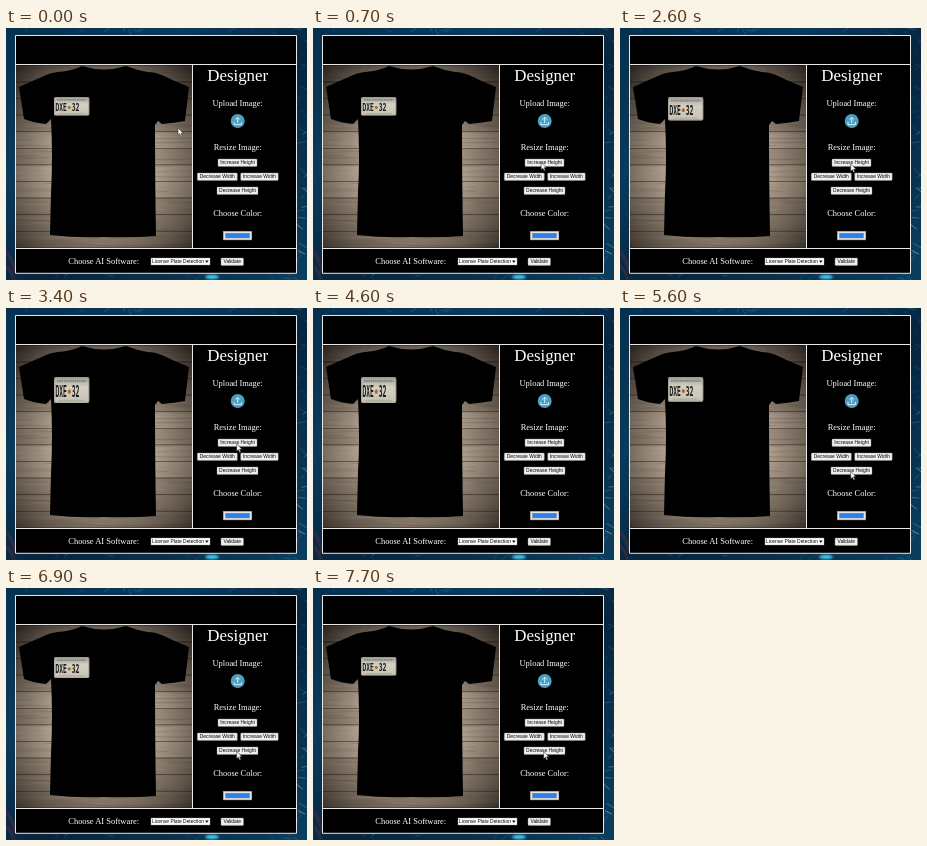
These frames come from a looping animation (301 px wide and 252 px high, 8000 ms). An HTML page:

```html
<!DOCTYPE html>
<html lang="en">
<head>
<meta charset="utf-8">
<title>Designer</title>
<style>
html, body { margin: 0; width: 100%; height: 100%; overflow: hidden; background: #06131f; }
svg { display: block; width: 301px; height: 252px; }
.serif { font: 8.45px "Liberation Serif", serif; fill: #fff; text-anchor: middle; }
.serif .title { font-size: 16.9px; }
.ui { font: 4.95px "Liberation Sans", sans-serif; fill: #000; text-anchor: middle; }
.mono { font: bold 6.3px "Noto Sans Mono", monospace; fill: #1d1c1b; }
</style>
</head>
<body>
<svg viewBox="0 0 301 252">
  <defs>
    <linearGradient id="sky" x2="1" y2="1">
      <stop offset="0" stop-color="#06304f"/>
      <stop offset=".3" stop-color="#0a3a5c"/>
      <stop offset=".55" stop-color="#06253f"/>
      <stop offset="1" stop-color="#0b3f5f"/>
    </linearGradient>
    <radialGradient id="shade" cx=".5" cy=".55" r=".72">
      <stop offset=".4" stop-color="#0d0905" stop-opacity="0"/>
      <stop offset=".75" stop-color="#0d0905" stop-opacity=".42"/>
      <stop offset="1" stop-color="#0d0905" stop-opacity=".8"/>
    </radialGradient>
    <linearGradient id="metal" x2="0" y2="1">
      <stop offset="0" stop-color="#a5a39c"/>
      <stop offset=".4" stop-color="#d3d0c4"/>
      <stop offset="1" stop-color="#c6c2b3"/>
    </linearGradient>
    <filter id="soft" x="-1" y="-1" width="3" height="3"><feGaussianBlur stdDeviation="1.3"/></filter>
    <clipPath id="room"><rect x="10" y="37" width="176" height="183"/></clipPath>
  </defs>

  <rect width="301" height="252" fill="url(#sky)"/>
  <g id="glow" fill="none"></g>
  <g filter="url(#soft)">
    <path d="M0 224Q6 230 9 243M0 238Q5 242 8 252" fill="none" stroke="#8a2c30" stroke-width="1.4" opacity=".75"/>
    <ellipse cx="206" cy="249" rx="7" ry="2.2" fill="#3fc4e6"/>
  </g>

  <rect x="9.5" y="7.5" width="281" height="238" fill="#000"/>
  <g clip-path="url(#room)">
    <g id="wood"></g>
    <rect x="10" y="37" width="176" height="183" fill="url(#shade)"/>
    <path d="M76 38Q66 43 52 44Q43 45 38 48Q24 54 13 59L18 91Q28 95 40 96L45 91Q47 130 45 165L44 207Q70 210 98 209Q126 210 150 208Q149 150 149 97L152 93L156 96Q168 95 179 93L183 59Q168 53 156 47Q148 44 142 44Q130 42 120 38Q98 45 76 38Z" fill="#000"/>
  </g>

  <g id="plate">
    <rect width="35.3" height="19" rx="1.6" fill="url(#metal)"/>
    <rect x=".6" y=".6" width="34.1" height="17.8" rx="1.2" fill="none" stroke="#8d8a82" stroke-width=".5"/>
    <path d="M3 3H32.5" stroke="#77736f" stroke-width="1.8" stroke-dasharray="1.6 .6" opacity=".7"/>
    <path d="M5 17H30.5" stroke="#8e8a80" stroke-width=".9" stroke-dasharray="1.2 .5" opacity=".6"/>
    <circle cx="15.3" cy="10.7" r="1.5" fill="#a8651f"/>
    <g class="mono" transform="translate(0 14.4) scale(1 1.75)">
      <text x="1.5">DXE</text><text x="17.7">32</text>
    </g>
  </g>

  <path d="M9.5 7.5H290.5V245.3H9.5ZM9.5 36.5H290.5M186.5 36.5V220.5M9.5 220.5H290.5" fill="none" stroke="#e8e8e8"/>

  <g class="serif">
    <text class="title" x="231.7" y="53">Designer</text>
    <text x="231.7" y="77.5">Upload Image:</text>
    <text x="231.7" y="122">Resize Image:</text>
    <text x="231.7" y="187.5">Choose Color:</text>
    <text x="97.7" y="235.5">Choose AI Software:</text>
  </g>

  <circle cx="231.7" cy="93" r="7" fill="#4a9fc3"/>
  <path d="M231.7 95V89.6M229.5 91.6L231.7 89.3L233.9 91.6M228 94V96.6H235.4V94" fill="none" stroke="#e9f6fb" stroke-width=".9"/>

  <g id="buttons" class="ui"></g>
  <rect x="145" y="230" width="59" height="7" fill="#fff" stroke="#999" stroke-width=".4"/>
  <text class="ui" x="172" y="235.3">License Plate Detection</text>
  <path d="M199 232.5H202.6L200.8 235Z" fill="#111"/>

  <rect x="217.3" y="203.3" width="28.5" height="8.6" fill="#e6e6e6" stroke="#aaa" stroke-width=".5"/>
  <rect x="219.5" y="205.2" width="24" height="4.8" fill="#2f80e8" stroke="#777" stroke-width=".4"/>

  <path id="cursor" d="M0 0V7.2L1.7 5.7L2.9 8.4L4.1 7.9L2.9 5.2H5.2Z" fill="#fff" stroke="#222" stroke-width=".5"/>
</svg>
<script>
const $ = id => document.getElementById(id);
let seed = 7;
const rand = (a, b) => {
  seed = seed * 16807 % 2147483647;
  return a + (b - a) * seed / 2147483647;
};
function add(parent, tag, attrs, text = '') {
  const el = document.createElementNS('http://www.w3.org/2000/svg', tag);
  for (const k in attrs) el.setAttribute(k, attrs[k]);
  el.textContent = text;
  $(parent).append(el);
}

// Circuit lights around the panel, brightest at the lower right
for (let i = 0; i < 60; i++) {
  const side = i % 2, x = side ? rand(288, 300) : rand(-4, 301);
  const y = side ? rand(0, 252) : i % 4 ? rand(0, 8) : rand(245, 252);
  add('glow', 'path', {
    d: `M${x} ${y}l${rand(2, 9)} ${rand(-8, 8)}`,
    stroke: side && y > 130 ? '#5d9ab5' : '#1f6d91', 'stroke-width': rand(.4, 1.1), opacity: rand(.3, .8)
  });
}

// Planks with grain
for (let y = 37; y < 220; y += 16.6) {
  add('wood', 'rect', { x: 10, y, width: 176, height: 16.6, fill: rand(0, 1) < .5 ? '#a09080' : '#b0a08f' });
  for (let i = 0; i < 16; i++) {
    const x = rand(-10, 170), w = rand(20, 70);
    add('wood', 'path', {
      d: `M${x} ${y + rand(1, 16)}q${w / 2} ${rand(-2, 2)} ${w} 0`, fill: 'none',
      stroke: i % 3 ? '#7d6c5d' : '#c4b5a4', 'stroke-width': rand(.3, .8), opacity: .5
    });
  }
  add('wood', 'rect', { x: 10, y, width: 176, height: .7, fill: '#5c4d40' });
}

// Label, left, top, width
[['Increase Height', 212, 131, 39], ['Decrease Width', 191.3, 145, 40],
 ['Increase Width', 234.7, 145, 37.5], ['Decrease Height', 211, 159, 41],
 ['Validate', 215, 230, 22.5]].forEach(([label, x, y, width]) => {
  add('buttons', 'rect', { x, y, width, height: 7.4, rx: .7, fill: '#f0f0f0', stroke: '#888', 'stroke-width': .4 });
  add('buttons', 'text', { x: x + width / 2, y: y + 5.4 }, label);
});

const ramp = (t, a, b) => Math.min(1, Math.max(0, (t - a) / (b - a)));
const ease = p => p * p * (3 - 2 * p);

function draw(now) {
  const t = Math.floor(now % 8000 / 100) * 100;
  const height = 18.6 + 7.4 * (ramp(t, 1100, 3400) - ramp(t, 5200, 7700));
  $('plate').setAttribute('transform', `translate(48 69) scale(1 ${height / 19})`);

  const p = ease(ramp(t, 0, 800));
  const x = 172 + 58.7 * p, y = t < 4500 ? 100 + 36 * p : 163.5;
  $('cursor').setAttribute('transform', `translate(${x} ${y})`);
  $('cursor').setAttribute('visibility', t >= 4000 && t < 4900 ? 'hidden' : 'visible');
  requestAnimationFrame(draw);
}
requestAnimationFrame(draw);
</script>
</body>
</html>
```
